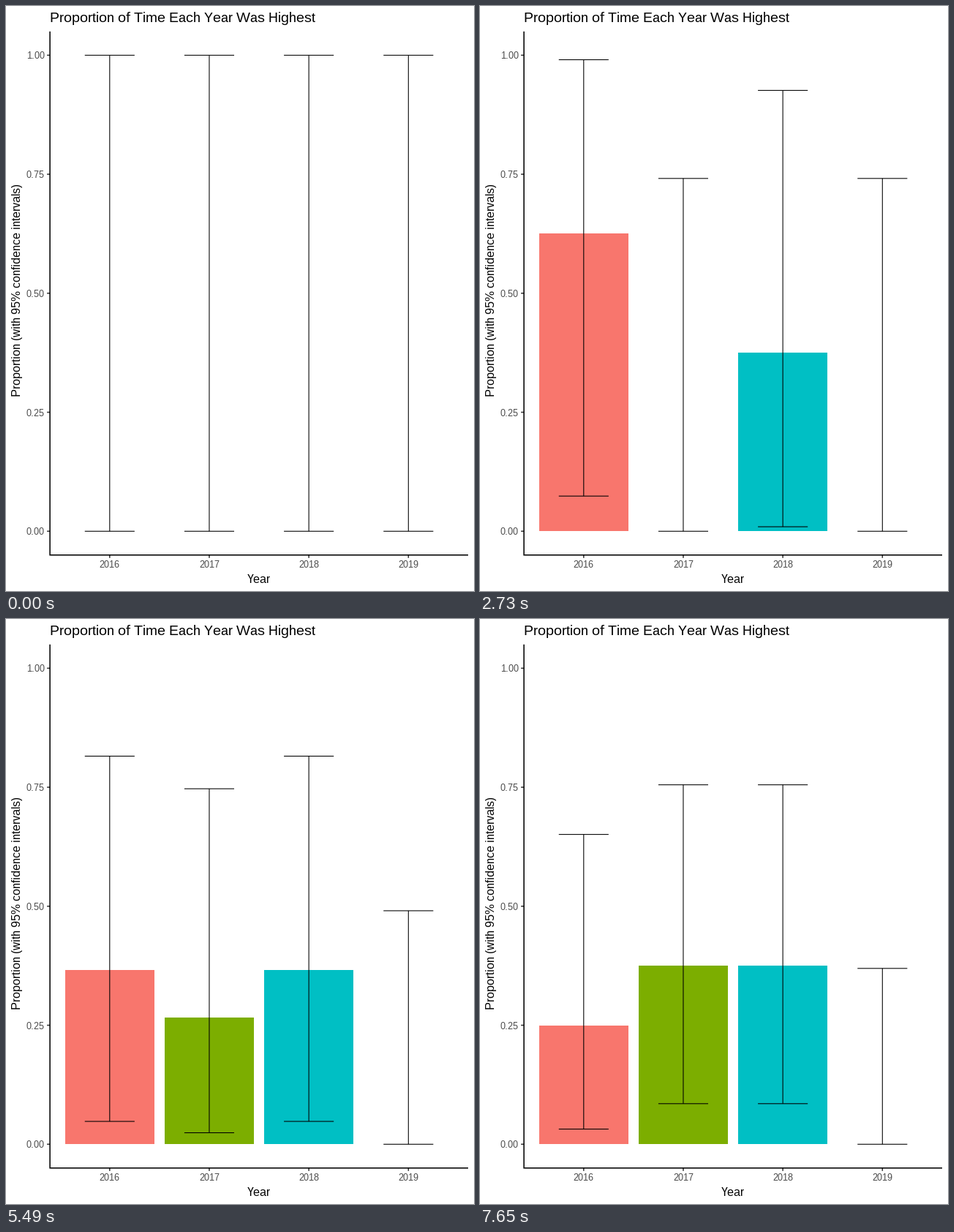
Animation of 640x800 px, one loop 8000 ms. Source, as a matplotlib script:

```python
from math import comb

import matplotlib.pyplot as plt
from matplotlib.animation import FuncAnimation
from matplotlib.patches import Rectangle

# crisp, grid-fitted glyphs without pair kerning
plt.rcParams.update({"text.hinting": "native", "text.hinting_factor": 1,
                     "text.kerning_factor": 6})

W, H, DPI = 640, 800, 80
PT = 72 / DPI  # points per pixel
LOOP, TICK = 8000, 20
PERIOD, STEP, MOVES = 960, 30, 16
Y0, Y1 = 718.28, 67.33
LEFT, TOP, RIGHT, BOTTOM = 60.1, 34.8, 632, 750.8
UNIT = (RIGHT - LEFT) / 4.2
AXIS_WIDTH, BAR_WIDTH = 1.55, 1.07
GREY = "#333333"
YEARS = ["2016", "2017", "2018", "2019"]
COLORS = ["#F8766D", "#7CAE00", "#00BFC4", "#C77CFF"]
WINNERS = [2, 0, 0, 1, 2, 1, 2, 1]  # year that was highest in each round


def solve(tail):
    """Root in 0..1 of an increasing tail probability equal to 0.025."""
    lo, hi = 0.0, 1.0
    for _ in range(50):
        mid = (lo + hi) / 2
        lo, hi = (mid, hi) if tail(mid) < 0.025 else (lo, mid)
    return lo


def at_least(k, n, p):
    return sum(comb(n, j) * p**j * (1 - p) ** (n - j) for j in range(k, n + 1))


def exact_interval(k, n):
    low = solve(lambda p: at_least(k, n, p)) if k else 0.0
    high = 1 - solve(lambda q: at_least(n - k, n, q)) if k < n else 1.0
    return low, high


def summary(n):
    """Share, lower and upper limit of every year after n rounds."""
    rows = []
    for year in range(4):
        k = WINNERS[:n].count(year)
        rows.append((k / n if n else 0.0, *exact_interval(k, n)))
    return rows


STATES = [summary(n) for n in range(len(WINNERS) + 1)]


def ypix(v):
    return Y0 + (Y1 - Y0) * v


fig = plt.figure(figsize=(W / DPI, H / DPI), dpi=DPI, facecolor="white")
ax = fig.add_axes([0, 0, 1, 1])
ax.set_xlim(0, W)
ax.set_ylim(H, 0)
ax.axis("off")


def line(xs, ys, width=BAR_WIDTH, color="black", z=3):
    return ax.plot(xs, ys, color=color, lw=width * PT, zorder=z, snap=False,
                   solid_capstyle="butt", solid_joinstyle="miter")[0]


def label(x, y, text, size, color="black", **kw):
    ax.text(x, y, text, fontsize=size * PT, color=color,
            family="Liberation Sans", **{"va": "baseline", **kw})


label(60, 22, "Proportion of Time Each Year Was Highest", 19)
label(346, 789, "Year", 16, ha="center")
label(20, 388, "Proportion (with 95% confidence intervals)", 16,
      rotation=90, rotation_mode="anchor", ha="center")

line([LEFT, LEFT, RIGHT], [TOP, BOTTOM, BOTTOM], AXIS_WIDTH)
for i in range(5):
    y = ypix(i / 4)
    line([LEFT - 4, LEFT], [y, y], AXIS_WIDTH, GREY, 2)
    label(53, round(y) + 5, f"{i / 4:.2f}", 13, "#4D4D4D", ha="right")

centers = [LEFT + UNIT * (0.6 + i) for i in range(4)]
bars, whiskers = [], []
for x, year, color in zip(centers, YEARS, COLORS):
    line([x, x], [BOTTOM, BOTTOM + 4], AXIS_WIDTH, GREY, 2)
    label(x, 768, year, 13, "#4D4D4D", ha="center")
    bar = Rectangle((x - 0.45 * UNIT, Y0), 0.9 * UNIT, 0, fc=color, lw=0,
                    snap=True, zorder=1)
    bars.append(ax.add_patch(bar))
    a, b = x - UNIT / 4, x + UNIT / 4
    whiskers.append([line([a, b], [Y0, Y0]), line([a, b], [Y1, Y1]),
                     line([x, x], [Y0, Y1])])


def draw(i):
    time = i * TICK + TICK / 2
    n, phase = divmod(time + PERIOD / 2, PERIOD)
    n = int(n)
    # each period opens with the move into the next state, then holds
    f = min(phase // STEP + 1, MOVES) / MOVES
    old, new = STATES[max(n - 1, 0)], STATES[n]
    for bar, parts, start, end in zip(bars, whiskers, old, new):
        share, low, high = (ypix(p + (q - p) * f) for p, q in zip(start, end))
        bar.set_height(share - Y0)
        bar.set_visible(Y0 - share > 0.01)
        parts[0].set_ydata([low, low])
        parts[1].set_ydata([high, high])
        parts[2].set_ydata([low, high])
    return bars + sum(whiskers, [])


anim = FuncAnimation(fig, draw, frames=LOOP // TICK, interval=TICK,
                     init_func=lambda: draw(0), repeat=True, repeat_delay=0)
plt.show()
```
